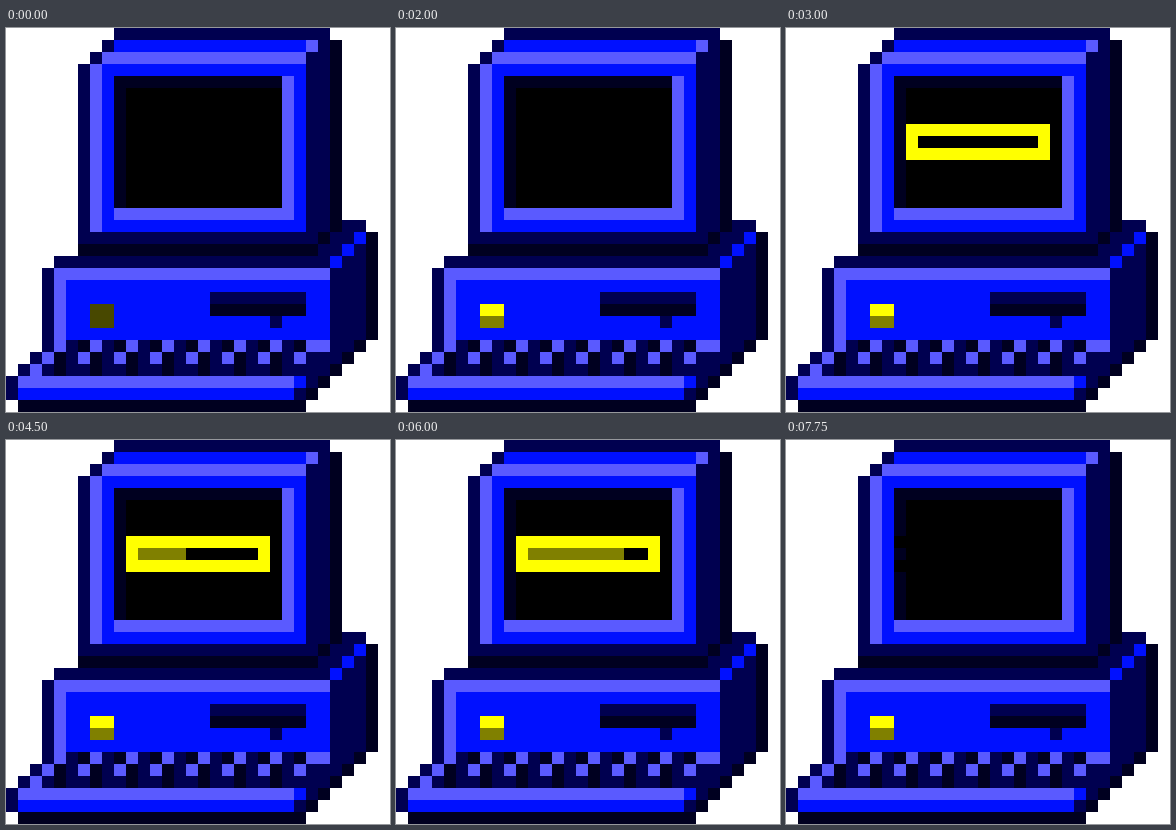
An HTML page for the animation above (8 s loop, 384 px wide and 384 px high).

```html
<!DOCTYPE html>
<html lang="en">
<head>
<meta charset="utf-8">
<title>Booting computer</title>
<style>
  html, body { margin: 0; width: 100%; height: 100%; overflow: hidden; background: #fff; }
  svg { display: block; width: 100vw; height: 100vh; }
</style>
</head>
<body>
<svg id="stage" viewBox="0 0 32 32" shape-rendering="crispEdges"></svg>
<script>
const stage = document.getElementById('stage');
const NAVY = '#000050', DARK = '#000020', BLUE = '#0010ff', LIGHT = '#5a5aff';
const YELLOW = '#ffff00', OLIVE = '#808000', OFF = '#484800', BLACK = '#000';
const LOOP = 8000;

// One unit is one pixel-art cell.
function box(fill, x, y, w = 1, h = 1) {
  const r = document.createElementNS('http://www.w3.org/2000/svg', 'rect');
  const attrs = { x, y, width: w, height: h, fill };
  for (const k in attrs) r.setAttribute(k, attrs[k]);
  stage.appendChild(r);
  return r;
}

function drawMonitor() {
  box(NAVY, 9, 0, 18);
  box(NAVY, 8, 1, 19);
  box(NAVY, 7, 2, 20);
  box(NAVY, 6, 3, 21, 15);
  box(DARK, 27, 1, 1, 16);
  box(BLUE, 9, 1, 16);
  box(LIGHT, 25, 1);
  box(LIGHT, 8, 2, 17);
  box(LIGHT, 7, 3, 1, 14);
  box(BLUE, 8, 3, 17, 14);
  box(LIGHT, 9, 4, 15, 12);
  box(DARK, 9, 4, 14, 11);
  box(BLACK, 10, 5, 13, 10);
}

function drawCase() {
  box(NAVY, 28, 16, 2);
  box(NAVY, 27, 17, 3);
  box(NAVY, 26, 18, 4);
  box(NAVY, 4, 19, 26);
  box(NAVY, 3, 20, 27, 6);
  box(DARK, 30, 17, 1, 9);
  box(DARK, 26, 17);
  box(DARK, 6, 18, 20);
  for (let i = 0; i < 3; i++) box(BLUE, 29 - i, 17 + i);
  box(LIGHT, 4, 20, 23);
  box(LIGHT, 4, 21, 1, 5);
  box(BLUE, 5, 21, 22, 5);
  box(NAVY, 17, 22, 8);
  box(DARK, 17, 23, 8);
  box(NAVY, 22, 24);
}

function drawKeyboard() {
  for (let i = 0; i < 5; i++) {
    const left = Math.max(0, 3 - i);
    box(NAVY, left, 26 + i, 29 - i - left);
    box(DARK, 29 - i, 26 + i);
  }
  for (let k = 0; k < 8; k++) {
    const x = 3 * k;
    box(LIGHT, x + 4, 26);
    box(LIGHT, x + 3, 27);
    if (k < 7) {
      box(DARK, x + 6, 26);
      box(DARK, x + 4, 27);
      box(DARK, x + 4, 28);
    }
  }
  box(LIGHT, 25, 26, 2);
  box(LIGHT, 2, 28);
  box(LIGHT, 1, 29, 23);
  box(BLUE, 24, 29);
  box(BLUE, 1, 30, 23);
  box(DARK, 1, 31, 24);
}

drawMonitor();
drawCase();
drawKeyboard();

const lampTop = box(OFF, 7, 23, 2);
const lampBottom = box(OFF, 7, 24, 2);
const frame = box(YELLOW, 10, 8, 12, 3);
const track = box(BLACK, 11, 9, 10);
const fill = box(OLIVE, 11, 9, 0);
const notches = [box(BLACK, 9, 8), box(BLACK, 9, 10)];

const lampToggles = [1000, 1500, 2000, 2250, 2500];
const fillSteps = [3250, 3500, 4250, 4500, 5250, 5500, 5750, 6000, 6750, 7500];
const passed = (times, t) => times.filter(s => t >= s).length;
const show = (el, on) => el.setAttribute('visibility', on ? 'visible' : 'hidden');

function render(t) {
  const lit = passed(lampToggles, t) % 2 === 1;
  lampTop.setAttribute('fill', lit ? YELLOW : OFF);
  lampBottom.setAttribute('fill', lit ? OLIVE : OFF);

  const loading = t >= 3000 && t < 7750;
  [frame, track, fill].forEach(el => show(el, loading));
  fill.setAttribute('width', passed(fillSteps, t));
  notches.forEach(el => show(el, t >= 7750));
}

const start = performance.now();
function tick() {
  render((performance.now() - start) % LOOP);
  requestAnimationFrame(tick);
}
tick();
</script>
</body>
</html>
```
